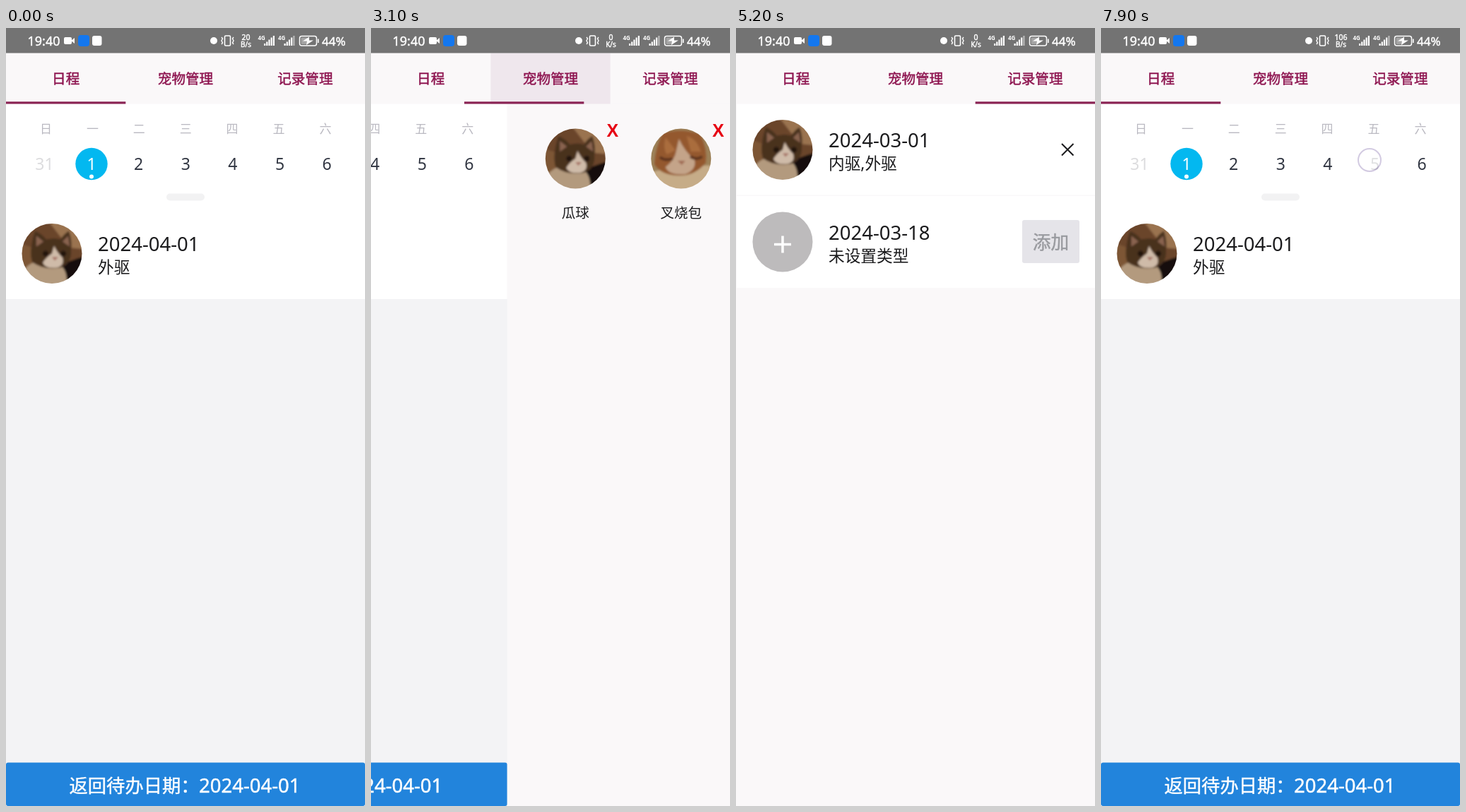
Recreate the animation shown at these times as an HTML page. Size 508 px wide and 1102 px high, loop 8000 ms.

```html
<!DOCTYPE html>
<html lang="zh-CN">
<head>
<meta charset="utf-8">
<title>Pet schedule</title>
<style>
  html, body { margin: 0; width: 100%; height: 100%; overflow: hidden; background: #faf8f9; }
  svg { display: block; width: 508px; height: 1102px; font-family: 'Noto Sans', 'Noto Sans CJK SC', 'Noto Sans CJK', sans-serif; }
</style>
</head>
<body>
<svg id="stage" viewBox="0 0 508 1102"></svg>
<script>
const PAGE = 508, TAB = PAGE / 3, LOOP = 8000;
const INK = '#1b1b1d', ACCENT = '#8e1550';

const text = (x, y, size, fill, content, extra = '') =>
  `<text x="${x}" y="${y}" font-size="${size}" fill="${fill}" ${extra}>${content}</text>`;
const centred = (x, y, size, fill, content, extra = '') =>
  text(x, y, size, fill, content, `text-anchor="middle" ${extra}`);
const medium = colour => `stroke="${colour}" stroke-width=".45"`;
const rect = (x, y, w, h, fill, rx = 0) =>
  `<rect x="${x}" y="${y}" width="${w}" height="${h}" fill="${fill}" rx="${rx}"/>`;
const circle = (x, y, r, fill) => `<circle cx="${x}" cy="${y}" r="${r}" fill="${fill}"/>`;
const path = (d, fill) => `<path d="${d}" fill="${fill}"/>`;
const line = (d, stroke, width) => `<path d="${d}" fill="none" stroke="${stroke}" stroke-width="${width}"/>`;
const place = (id, x, y) => `<use href="#${id}" x="${x}" y="${y}"/>`;
const portrait = (id, shapes) =>
  `<g id="${id}"><g clip-path="url(#round)"><g filter="url(#soft)">${shapes}</g></g></g>`;

const darkCat = portrait('darkCat',
  rect(-50, -50, 100, 100, '#6b452b') +
  path('M-8-50H50V-6L28-8L12-24Z', '#9a7350') +
  path('M-50-16L-26-8V24H-50Z', '#7d5636') +
  path('M10 16L50 2V50H2Z', '#17110f') +
  path('M-50 50C-42 10-20 8 0 12C16 14 24 26 20 50Z', '#b39a7e') +
  path('M-24-32Q-14-28-8-20Q4-23 12-20Q18-29 24-32Q29-18 27-4Q28 14 12 20Q-12 24-28 12Q-33-4-24-32Z', '#48301f') +
  path('M-22-25L-12-17L-22-10ZM23-25L15-17L25-10Z', '#8a6450') +
  path('M3-11Q7-2 15 6Q18 17 7 20Q-9 22-13 13Q-8 5 0 0Z', '#cfbba9') +
  circle(-9, 0, 4, '#23150e') + circle(16, 0, 4, '#23150e') +
  path('M0 5H9L4 10Z', '#a46f62'));

const gingerCat = portrait('gingerCat',
  rect(-50, -50, 100, 100, '#9c8159') +
  path('M-50 22Q-10 8 50 10V50H-50Z', '#c6ac88') +
  path('M-26-36Q0-44 27-35Q38-14 35 6Q20 24-2 24Q-28 24-38 8Q-36-18-26-36Z', '#94592f') +
  path('M-22-30Q-26-14-20-6L-8-12ZM8-32Q22-28 28-10L14-10Z', '#aa6d3e') +
  path('M-3-28Q4-12 19 2Q22 16 6 22Q-18 24-22 12Q-9 2-7-10Z', '#c4a489') +
  line('M-30-2Q-22 4-12 0M13-3Q22 3 30-3', '#5b331d', 4) +
  path('M-5 3H6L1 9Z', '#a06a52'));

const addCircle = `<g id="add">${circle(0, 0, 42.5, '#bdbbbc')}${line('M-12 3.5H12M0-8.5V15.5', '#fff', 3.5)}</g>`;

const entry = (y, icon, date, kind) =>
  place(icon, 65, y) + text(130, y - 3.5, 27.5, INK, date) + text(130, y + 27.5, 22.7, INK, kind);

const schedulePage = () => {
  const dayColours = ['#dcdcde', '#fff'];
  return rect(0, 107, PAGE, 995, '#f3f3f5') + rect(0, 107, PAGE, 277, '#fff') +
    [...'日一二三四五六'].map((d, i) => centred(56.5 + 65.9 * i, 148.5, 17, '#bab9c1', d)).join('') +
    circle(121, 192.5, 22.7, '#03b8f0') + circle(121, 210.5, 3, '#fff') +
    [31, 1, 2, 3, 4, 5, 6].map((d, i) =>
      centred(54.5 + 66.6 * i, 201, 23, dayColours[i] || '#303541', d)).join('') +
    rect(227, 234.5, 54, 10, '#f2f2f3', 5) +
    entry(319.5, 'darkCat', '2024-04-01', '外驱') +
    rect(0, 1040.6, PAGE, 61.4, '#2284dc', 3) +
    text(89.5, 1083, 26.3, '#fff', '返回待办日期：', medium('#fff')) +
    text(273, 1083, 27.5, '#fff', '2024-04-01', medium('#fff'));
};

const pet = (x, icon, name) => place(icon, x, 185) +
  centred(x, 269, 19.5, INK, name) +
  centred(x + 52.5, 154, 25, '#e60012', 'X', `font-weight="700" font-family="'Liberation Sans', sans-serif"`);

const petsPage = () => rect(0, 107, PAGE, 995, '#faf8f9') +
  pet(96.5, 'darkCat', '瓜球') + pet(246, 'gingerCat', '叉烧包') + place('add', 395.5, 185);

const recordsPage = () => rect(0, 107, PAGE, 995, '#faf8f9') +
  rect(0, 107, PAGE, 129.5, '#fff') + rect(0, 238, PAGE, 130, '#fff') +
  entry(172.5, 'darkCat', '2024-03-01', '内驱,外驱') +
  entry(303, 'add', '2024-03-18', '未设置类型') +
  line('M460 164L476.5 180.5M476.5 164L460 180.5', INK, 2) +
  rect(404, 272, 81, 61, '#e5e4e9', 3) +
  centred(444.5, 313, 25.7, '#999a9f', '添加', medium('#999a9f'));

const signal = (x, lastOpacity) => text(x, 17, 8, '#fff', '4G', 'font-weight="700"') +
  [3, 5.5, 8.5, 11.5, 14].map((h, i) =>
    `<g opacity="${i === 4 ? lastOpacity : 1}">${rect(x + 8.5 + i * 3.2, 25 - h, 2.2, h, '#fff')}</g>`).join('');

const statusBar = () => rect(0, 0, PAGE, 35.5, '#737373') +
  text(30.5, 25, 18, '#fff', '19:40', medium('#fff')) +
  rect(82, 13, 11, 10, '#fff', 2) + path('M92 18L97 14V22Z', '#fff') +
  rect(102, 10, 16, 16, '#1477ee', 4) + rect(122, 11, 13.5, 14, '#fff', 3) +
  circle(294, 18, 5, '#fff') +
  `<rect x="309.5" y="11" width="8" height="14" rx="1.5" fill="none" stroke="#fff" stroke-width="1.6"/>` +
  line('M305 13L306.5 15L305 18L306.5 21L305 23M322 13L320.5 15L322 18L320.5 21L322 23', '#fff', 1.4) +
  centred(339.5, 17, 10.5, '#fff', '', `id="rate" ${medium('#fff')}`) +
  centred(339.5, 27, 10, '#fff', '', `id="unit" ${medium('#fff')}`) +
  signal(356.5, 1) + signal(385, .5) +
  `<rect x="415.5" y="11.5" width="24" height="13.5" rx="3" fill="none" stroke="#fff" stroke-width="1.5"/>` +
  rect(417.5, 13.5, 9, 9.5, '#a5a5a5', 1) + rect(441, 15.5, 1.6, 5.5, '#fff') +
  path('M429 12.5L420 18.5H426L425 24L435 17.5H429Z', '#fff') +
  text(447, 25, 17, '#fff', '44%', medium('#fff'));

const tabBar = () => rect(0, 35, PAGE, 72.5, '#faf8f9') +
  `<rect id="flash" y="35.5" width="${TAB}" height="72"/>` +
  ['日程', '宠物管理', '记录管理'].map((label, i) =>
    centred(TAB * (i + .5), 79.3, 19.6, ACCENT, label, medium(ACCENT))).join('') +
  `<rect id="marker" y="104.3" width="${TAB}" height="3.2" fill="#8a2354"/>`;

const stage = document.getElementById('stage');
stage.innerHTML = `<defs>
    <clipPath id="round"><circle r="42.5"/></clipPath>
    <filter id="soft"><feGaussianBlur stdDeviation="1.6"/></filter>
    ${darkCat}${gingerCat}${addCircle}
  </defs>
  <g id="strip">${[schedulePage, petsPage, recordsPage].map((page, i) =>
    `<g transform="translate(${i * PAGE})">${page()}</g>`).join('')}</g>
  ${tabBar()}${statusBar()}
  <circle id="touch" r="16" fill="#fff" stroke="#cbc1dc" stroke-width="2"/>`;

const [strip, flash, marker, touch, rate, unit] =
  ['strip', 'flash', 'marker', 'touch', 'rate', 'unit'].map(id => document.getElementById(id));

const moves = [
  { tap: 2600, start: 2944.4, from: 0, to: 1 },
  { tap: 4200, start: 4570, from: 1, to: 2 },
  { tap: 6100, start: 6418.2, from: 2, to: 0 },
];
// Finger positions: time, duration, x, y, opacity
const touches = [
  [1600, 100, 251, 48, 1], [1700, 100, 272, 42, 1], [1800, 100, 297, 64, .8],
  [2600, 300, 255, 41, 1], [4200, 300, 425, 41, 1], [6100, 300, 85, 48, 1],
  [7800, 100, 380, 187, 1], [7900, 100, 380, 187, .85],
];

const clamp = v => Math.min(1, Math.max(0, v));
const smooth = v => v * v * (3 - 2 * v);
const spring = ms => {
  const x = Math.max(0, ms) * .0135;
  return 1 - (1 + x) * Math.exp(-x);
};

function draw(t) {
  const move = moves.filter(m => t >= m.tap).pop() || { tap: 0, start: 0, from: 0, to: 0 };
  const since = t - move.start, span = move.to - move.from;
  strip.setAttribute('transform', `translate(${-PAGE * (move.from + span * spring(since))})`);
  const slide = since < 0 ? 0 : smooth(clamp((since + 18.5) / 250));
  marker.setAttribute('x', TAB * (move.from + span * slide));

  const pressed = move.tap > 0 && t >= move.tap + 100 && since < 213;
  const fade = Math.max(0, (since - 81) / 76);
  flash.setAttribute('x', TAB * move.to);
  flash.setAttribute('fill', pressed ? `rgb(${236 + 3 * fade},${208 + 23 * fade},${223 + 14 * fade})` : 'none');

  const finger = touches.find(([at, length]) => t >= at && t < at + length);
  touch.setAttribute('opacity', finger ? finger[4] : 0);
  if (finger) touch.setAttribute('transform', `translate(${finger[2]} ${finger[3]})`);

  rate.textContent = t < 600 ? '20' : t < 6800 ? '0' : '106';
  unit.textContent = t >= 600 && t < 6800 ? 'K/s' : 'B/s';
}

const began = performance.now();
function tick() {
  draw(Math.floor((performance.now() - began) % LOOP / 100) * 100);
  requestAnimationFrame(tick);
}
tick();
</script>
</body>
</html>
```
